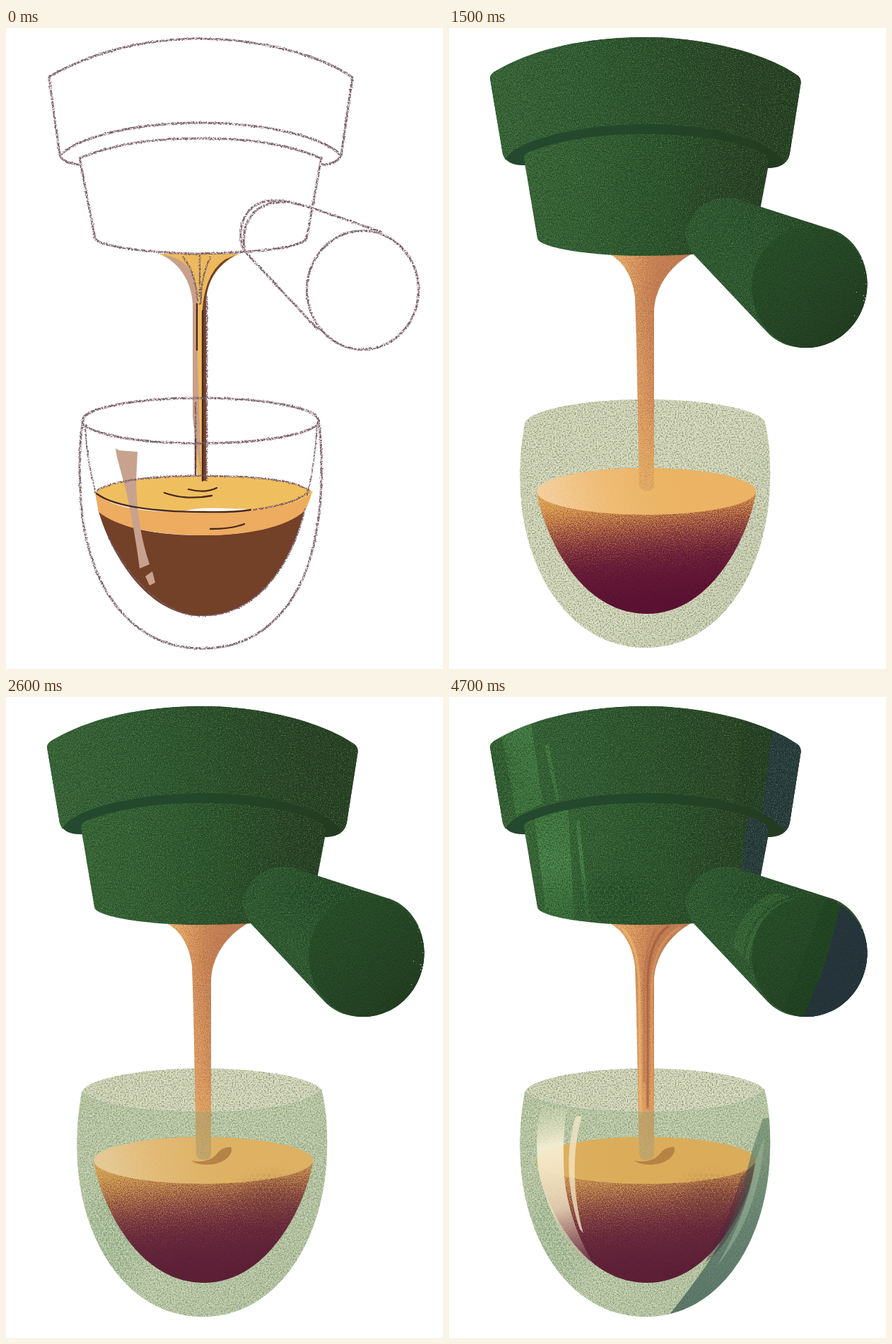
These frames come from a looping animation (618 px wide and 906 px high, 5.5 s). An HTML page:

```html
<!DOCTYPE html>
<html lang="en">
<head>
<meta charset="utf-8">
<title>Pouring espresso</title>
<style>
html, body { margin: 0; width: 100%; height: 100%; overflow: hidden; background: #fff; }
svg { display: block; width: 618px; height: 906px; }
</style>
</head>
<body>
<script>
const W = 618, H = 906, LOOP = 5500;

const shapes = {
  cap: 'M58 71Q58 66 64 62C120 28 198 13 278 13C364 13 451 37 493 67Q498 71 497.5 78L482 177C479 192 468 198 451 198L107 194C92 195 79 189 76 178Z',
  capFace: 'M58 71Q58 66 64 62C120 28 198 13 278 13C364 13 451 37 493 67Q498 71 497.5 78L482 177Q480 187 475 190C455 160 380 136 278 136C180 136 88 160 80 187L76 178Z',
  body: 'M106 184Q106 178 114 175C160 157 215 150 278 150C350 150 420 160 451 182V198L430 310Q400 320 278 322C190 322 126 309 125 297Z',
  handle: 'M390 240C402 239 412 243 420 246L535 283C570 291 591.5 325 591.5 362C591 413 552 452 505 452C483 452 464 445 450 430L348 322C336 310 333 295 337 281C345 257 364 241 390 240Z',
  disc: 'M428 366C428 320 464 282 510 282C556 282 591.5 318 591.5 362C591 413 552 452 505 452C462 452 428 413 428 366Z',
  stream: 'M220 317C248 326 260 355 263 380L265 440L269 645Q269 654 280 654Q290 654 290 645V400C291 370 310 335 348 317Z',
  glass: 'M107 560C110 540 190 525 280 525C370 525 436 540 446 555C452 575 455 610 454 640C452 765 385 876 278 876C170 876 102 765 100.5 640C100 610 103 582 107 560Z',
  front: 'M107 558C125 576 190 587 278 587C365 587 430 575 446 554C452 575 455 610 454 640C452 765 385 876 278 876C170 876 102 765 100.5 640C100 610 103 582 107 558Z',
  bowl: 'M124 657C124 637 193 622 279 622C364 622 434 637 434 657C424 717 372 828 280 828C185 828 135 717 124 657Z',
  crema: 'M124 655C124 637 193 622 279 622C364 622 434 637 434 655C434 673 364 688 279 688C193 688 124 673 124 655Z'
};

const clips = Object.entries(shapes).map(([id, d]) =>
  `<clipPath id="in-${id}"><path d="${d}"/></clipPath>`).join('');
const flat = (id, color, extra = '') => `<path d="${shapes[id]}" fill="${color}" ${extra}/>`;
const path = (d, color, extra = '') => `<path d="${d}" fill="${color}" ${extra}/>`;
const line = (d, extra = '') => `<path d="${d}" ${extra}/>`;
const inside = (id, content) => `<g clip-path="url(#in-${id})">${content}</g>`;
const shade = (id, paint) => inside(id,
  `<rect width="${W}" height="${H}" fill="url(#${paint})" filter="url(#dither)"/>`);
const specks = (id, grain) => flat(id, '#000', `filter="url(#${grain})"`);
const layer = (from, to, content) => `<g data-at="${from}-${to}">${content}</g>`;

const stops = list => list.map(([at, color, alpha = 1]) =>
  `<stop offset="${at}" stop-color="${color}" stop-opacity="${alpha}"/>`).join('');
const gradient = (id, [x1, y1, x2, y2], ...list) =>
  `<linearGradient id="${id}" gradientUnits="userSpaceOnUse" x1="${x1}" y1="${y1}" x2="${x2}" y2="${y2}">${stops(list)}</linearGradient>`;

const filter = (id, content) =>
  `<filter id="${id}" filterUnits="userSpaceOnUse" x="0" y="0" width="${W}" height="${H}" color-interpolation-filters="sRGB">${content}</filter>`;
const noise = (freq, seed) =>
  `<feTurbulence type="fractalNoise" baseFrequency="${freq}" numOctaves="2" seed="${seed}" result="noise"/>`;
const grain = (id, freq, seed, [r, g, b], gain, bias) => filter(id, noise(freq, seed) +
  `<feColorMatrix values="0 0 0 0 ${r / 255} 0 0 0 0 ${g / 255} 0 0 0 0 ${b / 255} 0 0 0 ${gain} ${bias}"/>
   <feComposite in2="SourceAlpha" operator="in"/>`);

const dotPattern = (id, color) =>
  `<pattern id="${id}" width="8" height="14" patternUnits="userSpaceOnUse"><g fill="${color}">
   <circle cx="4" cy="3.5" r="3.2"/><circle cx="0" cy="10.5" r="3.2"/><circle cx="8" cy="10.5" r="3.2"/></g></pattern>`;
let maskCount = 0;
const dots = (id, pattern, cx, cy, rx, ry, alpha) => {
  const mask = `fade${maskCount++}`;
  return `<mask id="${mask}" maskUnits="userSpaceOnUse" x="0" y="0" width="${W}" height="${H}">
    <ellipse cx="${cx}" cy="${cy}" rx="${rx}" ry="${ry}" fill="#fff" filter="url(#soft)"/></mask>` +
    inside(id, `<rect width="${W}" height="${H}" fill="url(#${pattern})" opacity="${alpha}" mask="url(#${mask})"/>`);
};

const defs = `<defs>${clips}
  ${filter('dither', noise(.8, 4) + '<feDisplacementMap in="SourceGraphic" in2="noise" scale="130" xChannelSelector="R" yChannelSelector="G"/>')}
  ${filter('soft', '<feGaussianBlur stdDeviation="12"/>')}
  ${filter('blur', '<feGaussianBlur stdDeviation="1.2"/>')}
  ${filter('pencil', noise(.45, 8) +
    `<feDisplacementMap in="SourceGraphic" in2="noise" scale="3" xChannelSelector="R" yChannelSelector="G" result="rough"/>
     <feColorMatrix in="noise" values="0 0 0 0 0 0 0 0 0 0 0 0 0 0 0 0 0 0 3.5 -1"/>
     <feComposite in="rough" operator="in" in2="noise" result="unshaped"/>
     <feComposite in="rough" in2="unshaped" operator="over"/>`.replace(/<feComposite[^]*$/, '<feComposite in="rough" operator="in"/>').replace('operator="in"/>', 'in2="holes" operator="in"/>').replace('-1"/>', '-1" result="holes"/>'))}
  ${grain('leafGrain', .7, 2, [95, 138, 84], 2.2, -1)}
  ${grain('darkGrain', .7, 11, [28, 48, 26], 2.2, -.95)}
  ${grain('glassDark', .5, 5, [140, 154, 122], 3.4, -1.45)}
  ${grain('glassLight', .65, 9, [238, 236, 212], 3, -1.4)}
  ${grain('brownGrain', .7, 7, [130, 70, 50], 1.4, -.75)}
  ${dotPattern('leafDots', '#16401f')}
  ${dotPattern('glassDots', '#6c9a72')}
  ${dotPattern('coffeeDots', '#6d3a34')}
  ${gradient('capPaint', [58, 90, 497, 70], [0, '#3a6c3b'], [.28, '#316035'], [.55, '#2a502a'], [.82, '#253f22'], [1, '#233b20'])}
  ${gradient('underPaint', [76, 170, 470, 170], [0, '#24492f'], [.5, '#23472a'], [1, '#233b20'])}
  ${gradient('bodyPaint', [106, 220, 450, 240], [0, '#396c3a'], [.25, '#336536'], [.6, '#29522a'], [.85, '#253f22'], [1, '#233b20'])}
  ${gradient('handlePaint', [350, 350, 500, 260], [0, '#2f5d33'], [.4, '#2d5a31'], [1, '#244a27'])}
  ${gradient('discPaint', [440, 300, 575, 430], [0, '#2a5429'], [.5, '#284c28'], [1, '#233f22'])}
  ${gradient('streamPaint', [262, 480, 294, 476], [0, '#ebb06c'], [.45, '#e2a566'], [1, '#c98558'])}
  ${gradient('streamTop', [250, 318, 340, 380], [0, '#d99358', .1], [.5, '#b8704a', .28], [1, '#a65a42', .15])}
  ${gradient('streamTip', [0, 540, 0, 650], [0, '#e9b26a', 0], [1, '#e6b067', .85])}
  ${gradient('bowlPaint', [270, 655, 285, 810], [0, '#e0a657'], [.18, '#c78449'], [.38, '#914740'], [.62, '#671c38'], [1, '#5a1030'])}
  ${gradient('cremaPaint', [140, 680, 300, 640], [0, '#f2cf9c'], [.45, '#efbd78'], [1, '#ebb363'])}
  ${gradient('glassPaint', [100, 600, 455, 860], [0, '#d2d5b8'], [.5, '#d6d9bd'], [1, '#c3c9ae'])}
  ${gradient('shine', [150, 580, 200, 810], [0, '#e6e5c6', .15], [.22, '#f7f0d6', .9], [.6, '#efe2c4', .8], [1, '#bc9a91', .05])}
  ${gradient('leafShine', [0, 30, 0, 320], [0, '#4e9250', .75], [.4, '#458647', .7], [.7, '#519553', .85], [1, '#3a7a40', .6])}
  ${gradient('glassShade', [440, 600, 330, 868], [0, '#56795f', .55], [.5, '#3d5f56', .65], [1, '#3d5d54', .75])}
</defs>`;

const sketch = `
  ${path('M130 680C160 710 220 717 280 717C340 717 395 705 423 678C408 742 365 831 277 831C195 831 145 735 130 680Z', '#734028')}
  ${path('M126 657C160 688 240 684 290 684C360 684 415 675 433 655Q429 670 423 682C395 707 340 717 280 717C220 717 160 708 131 684Z', '#edac60')}
  ${path('M126 657C140 640 205 633 279 633C360 633 420 642 434 656C415 675 360 684 290 684C235 684 155 678 126 657Z', '#efbf5f')}
  ${path('M252 683Q268 677 312 679L346 680Q320 686 252 683Z', '#fffaf0')}
  ${path('M155 594L160 597L186 599L184 640Q185 705 203 758L189 764Q182 710 170 655L157 607Z', '#c9a28f')}
  ${path('M197 775L207 768L211 784L203 788Z', '#c9a28f')}
  ${path('M216 319H330C298 335 284 358 282 388V640H271L265 550V390C264 355 244 331 216 319Z', '#ecba5c')}
  ${path('M222 321Q249 323 264 347L271 380V470L276 632L269 590L264 550V390C262 356 244 333 222 321Z', '#c8a08a')}
  ${path('M326 320C298 335 284 358 283 388V640H278L277 420Q276 350 310 327Z', '#734028')}
  <g fill="none" stroke="#49281f" stroke-width="2.3" stroke-linecap="round">
    ${line('M224 657Q255 668 291 661M258 652Q282 658 298 650M289 708Q320 708 337 701')}
    ${line('M128 658C155 679 225 684 280 684Q320 685 346 681')}
    ${line('M270 390V455M268 580V632M278 400V640')}
  </g>
  <g fill="none" stroke="#775a66" stroke-width="3.2" stroke-linecap="round" filter="url(#pencil)">
    ${line('M62 68C130 30 200 15 275 15C350 15 440 35 490 70L474 180C470 188 460 193 446 193M61 70L76 180C80 188 90 192 103 193')}
    ${line('M77 180C100 155 180 134 275 134C370 134 450 155 474 180')}
    ${line('M104 184C150 165 200 156 275 156C350 156 400 165 446 184L425 298C415 312 340 318 270 319C200 318 128 308 126 297Z')}
    ${line('M530 288L435 255C405 246 360 232 341 262C328 280 329 306 340 318L440 425M395 246C360 245 332 265 337 310')}
    <ellipse cx="504.5" cy="370.5" rx="79" ry="84"/>
    <ellipse cx="275" cy="555" rx="167" ry="32"/>
    ${line('M109 555C102 590 103 660 110 705C128 805 185 877 278 877C370 877 425 805 440 705C448 660 448 595 442 555')}
    ${line('M112 562Q114 612 127 656M440 562Q437 615 426 660', 'stroke-width="2"')}
    ${line('M126 656C145 640 205 633 276 633C355 633 415 640 428 654Q415 672 350 681', 'stroke-width="2.6"')}
    ${line('M423 680C408 742 365 831 277 831C225 831 175 780 145 720', 'stroke-width="2.2"')}
    ${line('M284 380V640M274 322V380M289 324Q276 350 275 390M250 323Q268 345 271 385M268 530V630', 'stroke-width="2.4"')}
  </g>`;

const silhouette = `
  ${flat('glass', '#fdf6dc')}${flat('bowl', '#edb56b')}${flat('stream', '#edb56b')}
  ${['cap', 'body', 'handle'].map(id => flat(id, '#223c22')).join('')}`;

const backTint = `
  ${flat('front', '#5f9c6e', 'opacity=".17"')}
  ${dots('front', 'glassDots', 150, 765, 40, 75, .45)}`;

const frontTint = `
  ${flat('front', '#6f9c62', 'opacity=".1"')}
  ${inside('front', flat('stream', '#a3a070', 'opacity=".4"'))}
  ${dots('bowl', 'coffeeDots', 372, 712, 40, 28, .45)}
  ${path('M262 655Q273 658 283 655C303 650 296 637 318 636C323 645 309 661 285 661Q269 661 262 655Z', '#b07c41', 'opacity=".85"')}
  ${line('M107 558C125 576 190 587 278 587C365 587 430 575 446 554', 'fill="none" stroke="#90b294" stroke-width="1" opacity=".5"')}`;

const bodyLight = `
  ${inside('capFace', path('M72 40L114 25L133 150L95 168Z', 'url(#leafShine)') +
    path('M135 68L141 66L156 146L152 147Z', 'url(#leafShine)') +
    path('M421 20L460 30L443 180L402 160Z', '#1e3922', 'opacity=".45"') +
    path('M458 40L510 65L490 205L441 180Z', '#26334a', 'opacity=".8"'))}
  ${inside('body', path('M120 165L168 150L178 325L139 320Z', 'url(#leafShine)') +
    path('M179 175L184 173L200 322L195 322Z', 'url(#leafShine)') +
    path('M423 165L460 175L441 260L411 255Z', '#26334a', 'opacity=".8"'))}`;

const handleLight = inside('handle',
  path('M403 354C405 318 430 286 463 276L483 282C445 294 422 318 416 366Z', '#438344', 'opacity=".38"') +
  path('M419 368C424 322 450 294 488 284L493 286C456 296 430 325 424 374Z', '#4a8a49', 'opacity=".42"'));

const glassLight = inside('front', `
  ${path('M130 577L166 584C161 620 160 672 167 705Q178 762 212 813C164 784 139 724 126 668Q121 620 130 577Z', 'url(#shine)')}
  ${path('M179 593L188 592C174 640 174 700 190 758L185 752C167 697 164 643 179 593Z', '#f5e8c8', 'opacity=".75"')}
  ${path('M444 596L480 590V720L430 860L306 880C356 818 399 760 417 690Q427 640 444 596Z', 'url(#glassShade)')}
  ${path('M433 658C426 715 394 778 362 800C386 752 404 714 413 678Z', '#482738', 'opacity=".4"')}
  ${path('M446 622C442 690 420 756 379 804C409 752 427 704 433 657Z', '#a4bd9d', 'opacity=".45"')}`);

const bodyTexture = `
  ${dots('body', 'leafDots', 235, 287, 50, 38, .42)}
  ${dots('capFace', 'leafDots', 72, 115, 18, 55, .4)}`;

const discShadow = inside('disc',
  path('M536 275L562 275L502 460L468 460Z', '#1c4420', 'opacity=".4"') +
  path('M560 275H600V460H499L530 382Z', '#29324a', 'opacity=".82"'));

const streamLines = inside('stream', `<g fill="none" stroke-linecap="round" filter="url(#blur)">
  ${line('M310 324Q279 346 281 415L281 580', 'stroke="#9a543c" stroke-width="2.4"')}
  ${line('M293 328Q274 360 276 430L276 545', 'stroke="#b06a45" stroke-width="1.6"')}
  ${line('M246 328Q268 350 269 410L271 590', 'stroke="#f1bb73" stroke-width="2.4"')}
  ${line('M326 326Q288 348 287 410V570', 'stroke="#e3a060" stroke-width="2"')}
</g>`);

const painted = `
  ${shade('glass', 'glassPaint')}
  ${layer(2000, LOOP, backTint)}
  ${specks('glass', 'glassDark')}${specks('glass', 'glassLight')}
  ${shade('bowl', 'bowlPaint')}${shade('crema', 'cremaPaint')}
  ${layer(3500, LOOP, flat('crema', '#e8af58', 'opacity=".9"'))}
  ${shade('stream', 'streamPaint')}${flat('stream', 'url(#streamTop)')}
  ${flat('stream', 'url(#streamTip)')}${specks('stream', 'brownGrain')}
  ${layer(3500, LOOP, streamLines)}
  ${layer(2000, LOOP, frontTint)}
  ${layer(3000, LOOP, glassLight)}
  ${flat('cap', 'url(#underPaint)')}${shade('capFace', 'capPaint')}${shade('body', 'bodyPaint')}
  ${layer(3000, LOOP, bodyLight)}
  ${layer(3500, LOOP, bodyTexture)}
  ${['capFace', 'body'].map(id => specks(id, 'leafGrain') + specks(id, 'darkGrain')).join('')}
  ${shade('handle', 'handlePaint')}
  ${layer(2000, LOOP, dots('handle', 'leafDots', 432, 283, 45, 22, .45))}
  ${layer(3000, LOOP, handleLight)}
  ${specks('handle', 'leafGrain')}${specks('handle', 'darkGrain')}
  ${shade('disc', 'discPaint')}
  ${layer(3500, LOOP, discShadow)}
  ${specks('disc', 'darkGrain')}`;

document.body.innerHTML = `<svg viewBox="0 0 ${W} ${H}" width="${W}" height="${H}">${defs}
  ${layer(0, 500, sketch)}${layer(500, 1500, silhouette)}${layer(1500, LOOP, painted)}</svg>`;

// Nested layers only ever show while their parent does, so each needs just its own window.
for (const el of document.querySelectorAll('[data-at]')) {
  const [from, to] = el.dataset.at.split('-').map(Number);
  const steps = [[0, from === 0], [from, true], [to, to === LOOP], [LOOP, to === LOOP]];
  el.animate(steps.map(([at, on]) => ({
    offset: at / LOOP, visibility: on ? 'visible' : 'hidden', easing: 'step-end'
  })), { duration: LOOP, iterations: Infinity });
}
</script>
</body>
</html>
```
